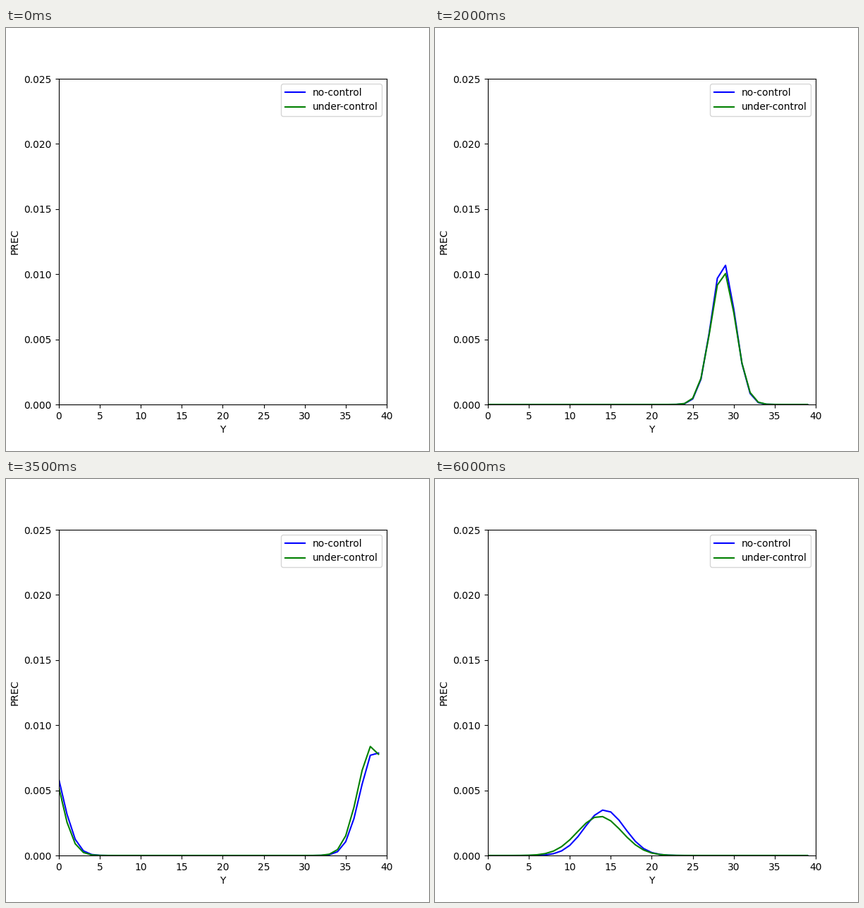
Write a matplotlib script that moves like this. It is 600 px wide and 600 px high and loops after 6.5 s.

```python
import numpy as np
import matplotlib.pyplot as plt
from matplotlib.animation import FuncAnimation

CELLS = 40
STEPS = 13
Y = np.arange(CELLS)

# Key points as (steps, values): the rain grows, decays and drifts along Y.
CENTER = (3, 7, 9, 11, 12), (25.42, 38.57, 44.26, 52.19, 54.25)
WIDTH = (3, 5, 7, 9, 12), (0.95, 1.96, 1.77, 1.68, 2.45)
PEAK = (2, 3, 4, 5, 6, 7, 8, 9, 12), (0, 21, 109, 186, 118, 81, 40.5, 34.5, 35)

# Effect of the control relative to the uncontrolled rain.
LAG = (5, 9), (0, 0.6)
WIDTH_RATIO = (5, 9, 12), (1.03, 0.96, 1.1)
PEAK_RATIO = (5, 9, 12), (0.94, 1.15, 0.86)


def rain(step, controlled):
    """Bell-shaped rain profile on the periodic domain."""
    center, width, peak = (np.interp(step, *k) for k in (CENTER, WIDTH, PEAK))
    if controlled:
        center -= np.interp(step, *LAG)
        width *= np.interp(step, *WIDTH_RATIO)
        peak *= np.interp(step, *PEAK_RATIO)
    dist = (Y - center + CELLS / 2) % CELLS - CELLS / 2
    return peak * 1e-4 * np.exp(-0.5 * (dist / width) ** 2)


fig, ax = plt.subplots(figsize=(6, 6), dpi=100)
fig.subplots_adjust(left=0.1249)
ax.set(xlim=(0, CELLS), ylim=(0, 0.025), xlabel="Y", ylabel="PREC")
ax.tick_params(axis="y", pad=3.9)
lines = [
    ax.plot([], [], color="blue", label="no-control")[0],
    ax.plot([], [], color="green", label="under-control")[0],
]
ax.legend(loc="upper right")


def draw(step):
    for controlled, line in enumerate(lines):
        if step == 0:
            line.set_data([], [])
        else:
            line.set_data(Y, rain(step, controlled))
    return lines


anim = FuncAnimation(fig, draw, frames=STEPS, interval=500,
                     repeat=True, repeat_delay=0)
plt.show()
```
